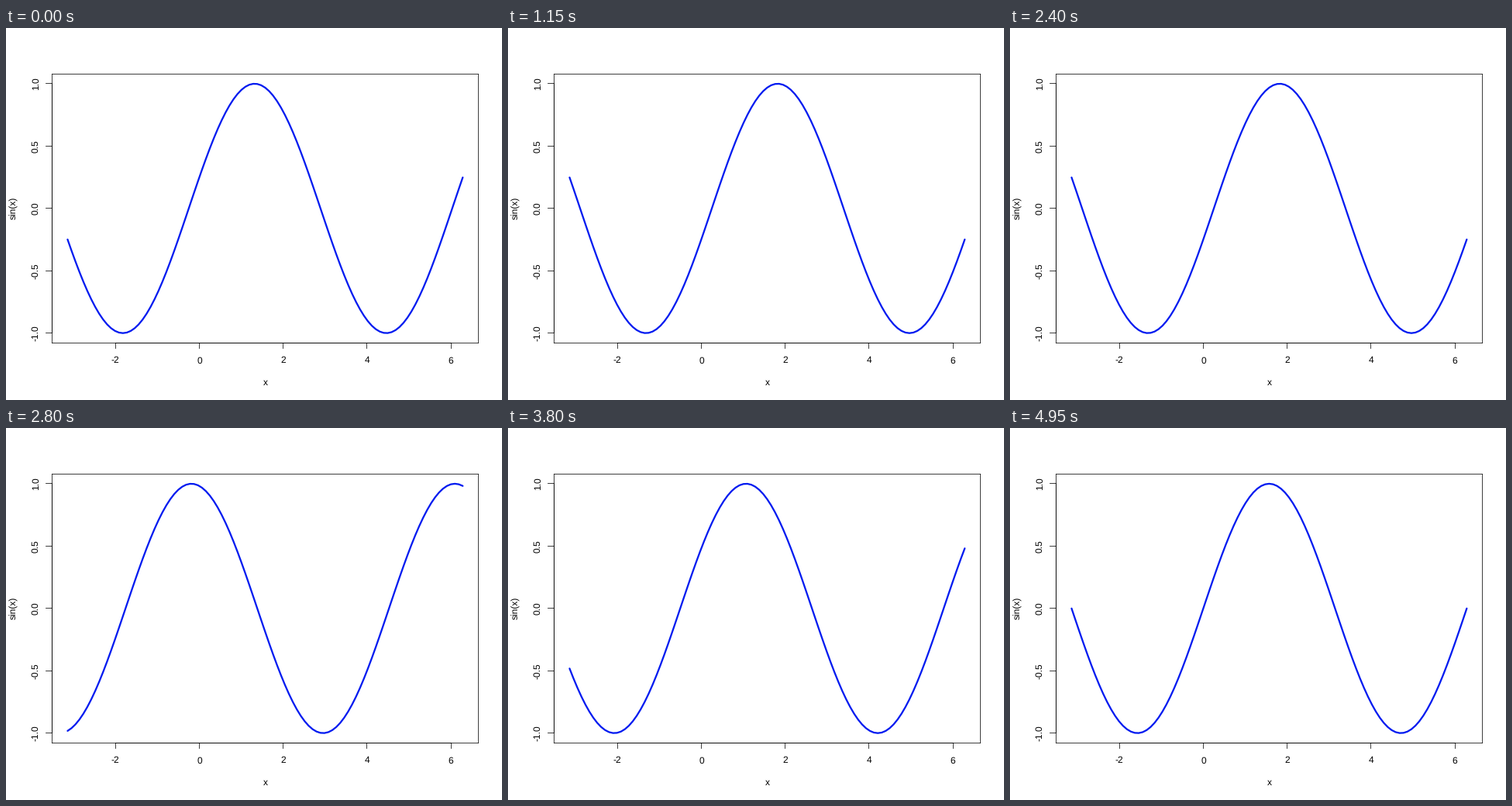
A matplotlib script for the animation above (5000 ms loop, 640x480 px).

```python
import math

import matplotlib.pyplot as plt
import numpy as np
from matplotlib.animation import FuncAnimation

W, H, DPI = 640, 480, 80
PT = 72 / DPI  # points per pixel
FRAMES, INTERVAL, CYCLE = 100, 50, 25

# Plot margins are counted in text lines
LINE = 14.4
LEFT, RIGHT = 4.1 * LINE, W - 2.1 * LINE
TOP, BOTTOM = 4.1 * LINE, H - 5.1 * LINE
TICK = LINE / 2

X0, X1 = -1.12 * math.pi, 2.12 * math.pi
Y0, Y1 = -1.08, 1.08

plt.rcParams["font.family"] = "Liberation Sans"
plt.rcParams["text.hinting"] = "none"

fig = plt.figure(figsize=(W / DPI, H / DPI), dpi=DPI, facecolor="white")
ax = fig.add_axes([0, 0, 1, 1])
ax.set_xlim(0, W)
ax.set_ylim(H, 0)
ax.axis("off")


def px(x):
    return LEFT + (x - X0) / (X1 - X0) * (RIGHT - LEFT)


def py(y):
    return BOTTOM - (y - Y0) / (Y1 - Y0) * (BOTTOM - TOP)


def mid(v):
    """Centre of the pixel that holds v."""
    return math.floor(v) + 0.5


def rule(xa, ya, xb, yb):
    ax.plot([mid(xa), mid(xb)], [mid(ya), mid(yb)], color="black",
            lw=0.75 * PT, solid_capstyle="projecting", snap=False)


def label(x, y, text, rotation=0):
    ax.text(x, y, text, size=12 * PT, color="black", ha="center",
            va="baseline", rotation=rotation, rotation_mode="anchor")


# Frame
for y in (TOP, BOTTOM):
    rule(LEFT, y, RIGHT, y)
for x in (LEFT, RIGHT):
    rule(x, TOP, x, BOTTOM)

# Axis lines lie over the frame between the outer ticks
rule(px(-2), BOTTOM, px(6), BOTTOM)
rule(LEFT, py(-1), LEFT, py(1))

for v in range(-2, 7, 2):
    rule(px(v), BOTTOM, px(v), BOTTOM + TICK)
    label(px(v), BOTTOM + 1.8 * LINE, str(v))

for v in np.linspace(-1, 1, 5):
    rule(LEFT - TICK, py(v), LEFT, py(v))
    label(LEFT - 1.2 * LINE, py(v), f"{v:.1f}", 90)

label((LEFT + RIGHT) / 2, BOTTOM + 3.8 * LINE, "x")
label(LEFT - 3.2 * LINE, (TOP + BOTTOM) / 2, "sin(x)", 90)

xs = np.linspace(-math.pi, 2 * math.pi, 101)
curve, = ax.plot([], [], color="#001af0", lw=2.25 * PT, snap=False,
                 solid_capstyle="round", solid_joinstyle="round")


def draw(i):
    phase = 2 * math.pi * (i + 1) / CYCLE
    curve.set_data(px(xs), py(np.sin(xs + phase)))
    return curve,


anim = FuncAnimation(fig, draw, frames=FRAMES, interval=INTERVAL,
                     repeat=True, repeat_delay=0)
plt.show()
```
